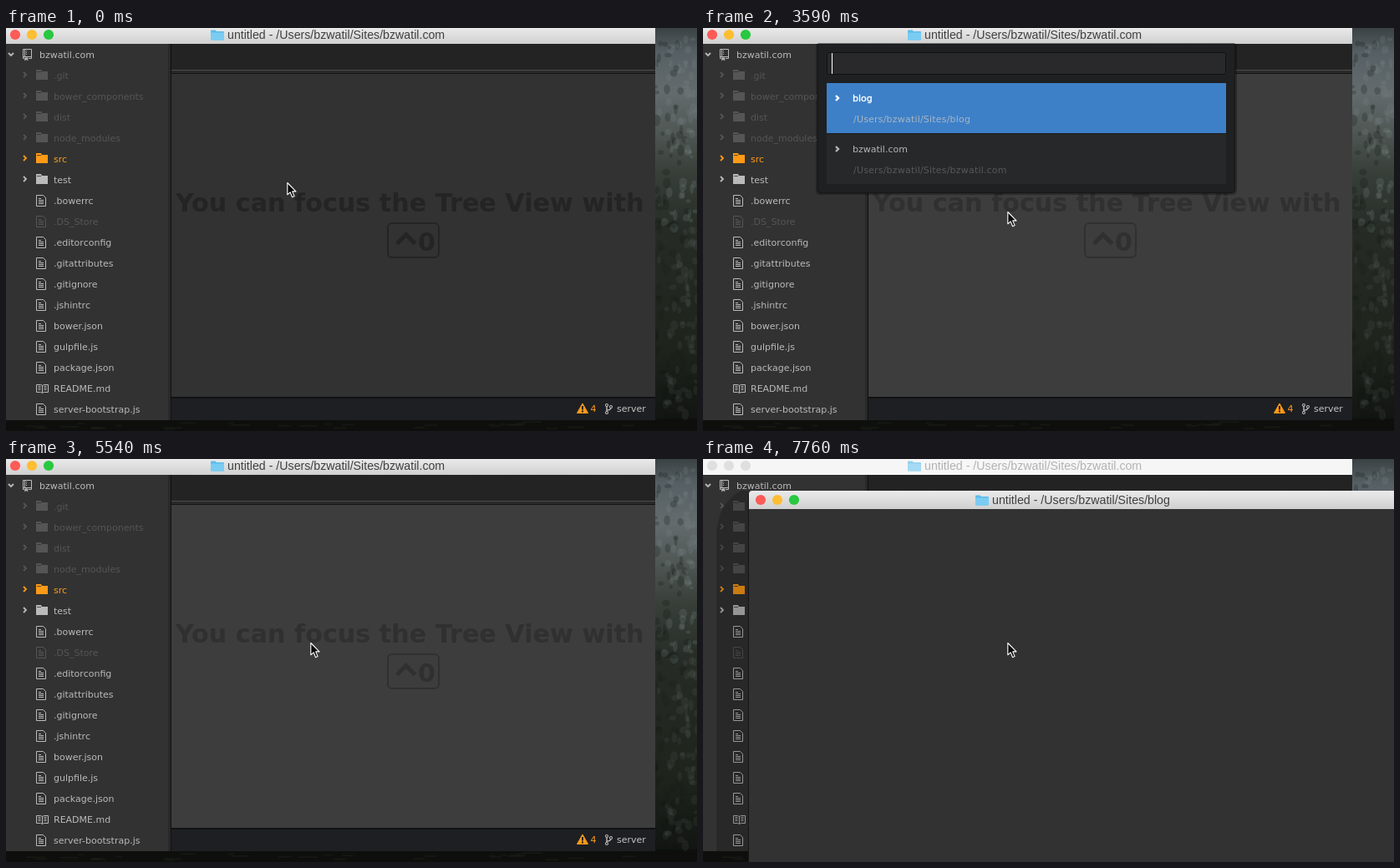
Recreate the animation shown at these times as an HTML page. Size 827 by 483 pixels, loop 8000 ms.

```html
<!DOCTYPE html>
<html lang="en">
<head>
<meta charset="utf-8">
<title>Project switcher</title>
<style>
html, body { margin: 0; width: 100%; height: 100%; overflow: hidden; background: #0d0e0d; }
svg { display: block; width: 827px; height: 483px; }
text { white-space: pre; font-kerning: none; }
.ui { font: 11px "DejaVu Sans", sans-serif; }
.path { font: 11px "DejaVu Sans", sans-serif; letter-spacing: .2px; }
.title { font: 14.2px "Liberation Sans", Arial, sans-serif; }
.tip { font: bold 30.2px "DejaVu Sans", sans-serif; }
</style>
</head>
<body>
<svg id="stage" viewBox="0 0 827 483" xmlns="http://www.w3.org/2000/svg"></svg>
<script>
const LOOP = 8000;
const USER = 'bzwatil', SITE = USER + '.com', ROOT = `/Users/${USER}/Sites/`;
const DIM = '#555', PLAIN = '#bababa', ORANGE = '#ff9a17';

const rect = (x, y, w, h, fill, extra = '') =>
  `<rect x="${x}" y="${y}" width="${w}" height="${h}" fill="${fill}" ${extra}/>`;
const text = (x, y, s, cls, fill, extra = '') =>
  `<text x="${x}" y="${y}" class="${cls}" fill="${fill}" ${extra}>${s}</text>`;
const line = (d, stroke, width = 1, extra = '') =>
  `<path d="${d}" fill="none" stroke="${stroke}" stroke-width="${width}" ${extra}/>`;
const fill = (d, color, extra = '') => `<path d="${d}" fill="${color}" ${extra}/>`;
const at = (x, y, body) => `<g transform="translate(${x} ${y})">${body}</g>`;
const group = (id, body) => `<g id="${id}">${body}</g>`;
const gradient = (id, stops) => `<linearGradient id="${id}" x2="0" y2="1">` +
  stops.map(([o, c]) => `<stop offset="${o}" stop-color="${c}"/>`).join('') + '</linearGradient>';

function random(seed) {
  return () => (seed = (seed * 16807) % 2147483647) / 2147483647;
}

// Misty forest behind the windows: a gradient with small dabs of foliage
function forest() {
  const rnd = random(77);
  let s = rect(770, 0, 57, 483, 'url(#mist)') + rect(0, 468, 827, 15, '#0e0f0d');
  for (let i = 0; i < 220; i++) {
    const x = 777 + rnd() * 50, y = 12 + rnd() * 455;
    const shade = rnd() * 50 < x - 777 ? '#7d878a' : '#0e130e';
    s += `<ellipse cx="${x}" cy="${y}" rx="${2 + rnd() * 3}" ry="${2 + rnd() * 5}" fill="${shade}" opacity="${y < 240 ? .22 : .1}"/>`;
  }
  for (let i = 0; i < 30; i++)
    s += rect(rnd() * 790, 471 + rnd() * 9, 6 + rnd() * 18, 2, '#20251a', 'opacity=".4"');
  return s;
}

const folderBlue = (x, y) => at(x, y,
  fill('M0 1.5Q0 .5 1 .5H5.5L7 2H15Q16 2 16 3V11.5Q16 12.5 15 12.5H1Q0 12.5 0 11.5Z', '#5dbdec') +
  rect(0, 3.5, 16, 9, '#7accf3', 'rx="1"'));

function titleBar(x, y, lights, labelX, label, ink) {
  const dots = lights.map((c, i) =>
    `<circle cx="${x + 11 + i * 20}" cy="${y}" r="6.1" fill="${c}"/>`).join('');
  return dots + folderBlue(labelX - 20, y - 6) + text(labelX, y + 5, label, 'title', ink);
}

const icons = {
  folder: c => fill('M0-7H6L7-5H14V5H0Z', c) + line('M1-4.5H6', '#323232', .8),
  file: c => line('M.5-6.5H8.5L11.5-3.5V6.5H.5ZM3-2.5H6M3-.5H9M3 1.5H9M3 3.5H9', c),
  book: c => line('M.5-4.5H5.5L7.5-3.5 9.5-4.5H14.5V4.5H9.5L7.5 5.5 5.5 4.5H.5ZM7.5-3.5V5M2.5-2.5H5.5M2.5-.5H5.5M2.5 1.5H5.5M9.5-2.5H12.5M9.5-.5H12.5M9.5 1.5H12.5', c)
};
const chevron = (x, y, c, w = 1.8) => line(`M${x} ${y - 3}l3 3-3 3`, c, w);

function treeRow([name, kind, color], i) {
  const y = 57 + i * 25;
  return (kind === 'folder' ? chevron(21, y - 1, color) : '') +
    at(36, y, icons[kind](color)) + text(57, y + 4, name, 'ui', color);
}

function sidebar() {
  const folders = ['.git', 'bower_components', 'dist', 'node_modules']
    .map(n => [n, 'folder', DIM]).concat([['src', 'folder', ORANGE], ['test', 'folder', PLAIN]]);
  const files = ['.bowerrc', '.DS_Store', '.editorconfig', '.gitattributes', '.gitignore', '.jshintrc',
    'bower.json', 'gulpfile.js', 'package.json', 'README.md', 'server-bootstrap.js']
    .map(n => [n, n.endsWith('.md') ? 'book' : 'file', n === '.DS_Store' ? DIM : PLAIN]);
  return rect(0, 19, 195, 451, '#323232') + rect(194, 19, 4, 451, '#292929') + rect(197, 19, 1, 451, '#101010') +
    line('M3 30l3 3 3-3', PLAIN, 1.8) +
    line('M20.5 25.5H30.5V36.5H27M22 36.5H20.5V25.5M22.5 26V34M20.5 34.5H30', PLAIN) +
    fill('M22.3 35.5H26.2V39.5L24.3 37.8 22.3 39.5Z', PLAIN) +
    rect(24, 27, 1, 1, PLAIN) + rect(24, 29, 1, 1, PLAIN) + rect(24, 31, 1, 1, PLAIN) +
    text(40, 36, SITE, 'ui', PLAIN) + folders.concat(files).map(treeRow).join('');
}

const keycap = (x, y, w) =>
  `<rect x="${x}" y="${y}" width="${w}" height="41" rx="5" fill="none" stroke="currentColor" stroke-width="2"/>`;

function editor() {
  const ink = 'currentColor';
  const focus = text(203, 219.5, 'You can focus the Tree View with', 'tip', ink) + keycap(457, 234, 61) +
    line('M468 258.5L478.7 247.5 489.5 258.5', ink, 5) + text(493, 266.5, '0', 'tip', ink);
  const split = text(212, 242.5, 'You can split a pane with', 'tip', ink) + keycap(654, 210, 109) +
    line('M671 226V223.5A3.5 3.5 0 1 0 667.5 227H682.5A3.5 3.5 0 1 0 679 223.5V238.5A3.5 3.5 0 1 0 682.5 235H667.5A3.5 3.5 0 1 0 671 238.5Z', ink, 2.6) +
    text(689, 242.5, 'K', 'tip', ink) + line('M725 234H756M749 227.5l7 6.5-7 6.5', ink, 2);
  return rect(198, 19, 579, 31, '#232323') + rect(198, 50, 579, 1, '#4d4d4d') +
    rect(198, 51, 579, 3, '#292929') + rect(198, 54, 579, 1, '#141414') +
    `<rect id="pane" x="198" y="55" width="579" height="387"/>` +
    group('focusTip', focus) + group('splitTip', split);
}

const statusBar = () =>
  rect(198, 442, 579, 28, '#1e1f22') + rect(198, 442, 579, 2, '#111213') +
  fill('M690 450L696.5 461.5H683.5Z', ORANGE, `stroke="${ORANGE}" stroke-linejoin="round"`) +
  rect(689, 453, 2, 4.5, '#1e1f22') + rect(689, 458.5, 2, 2, '#1e1f22') +
  text(699.5, 460, '4', 'ui', ORANGE) +
  line('M719 453V460M719 458Q724 458 724 455', PLAIN, 1.4) +
  [[719, 452], [719, 461], [724, 454]].map(([x, y]) =>
    `<circle cx="${x}" cy="${y}" r="1.5" fill="#1e1f22" stroke="${PLAIN}" stroke-width="1.1"/>`).join('') +
  text(731, 460, 'server', 'ui', '#c4c4c4');

function listItem(y, name, active) {
  const ink = active ? '#fff' : '#b4b5b7';
  return rect(148, y, 478, 60, active ? '#3d80c8' : '#27282a') +
    chevron(159, y + 18, ink, 2.4) +
    text(179, y + 22, name, 'ui', ink, active ? 'stroke="#fff" stroke-width=".35"' : '') +
    text(180, y + 47, ROOT + name, 'path', active ? '#a9b4c0' : '#57585a');
}
const list = pick => ['blog', SITE].map((n, i) => listItem(66 + i * 61, n, i === pick)).join('');

const dialog = () =>
  fill('M135 19H639V194Q639 200 633 200H141Q135 200 135 194Z', '#000', 'opacity=".3"') +
  fill('M137.5 19V193Q137.5 197.5 142 197.5H632Q636.5 197.5 636.5 193V19Z', '#1f2022', 'stroke="#151617"') +
  rect(148.5, 29.5, 477, 26, '#29292b', 'rx="2" stroke="#101112"') +
  rect(148, 126, 478, 1, '#1b1c1e') +
  group('list0', list(0)) + group('list1', list(1)) +
  group('caret', rect(154, 30, 1, 25, '#fff'));

const newWindow = () =>
  fill('M16 470V90Q18 52 46 38H60V470Z', '#000', 'opacity=".2"') +
  rect(54, 42, 1, 441, '#161616') +
  fill('M55 60V42Q55 38 59 38H827V60Z', 'url(#bar)') + rect(55, 60, 772, 423, '#323232') +
  titleBar(58, 49, ['#fc5b57', '#fdbe32', '#28c840'], 346, `untitled - ${ROOT}blog`, '#404040');

const oldTitle = `untitled - ${ROOT}${SITE}`;
const stage = document.getElementById('stage');
stage.innerHTML =
  '<defs>' + gradient('bar', [[0, '#eaeaea'], [1, '#d0d0d0']]) +
  gradient('mist', [[0, '#3a4244'], [.06, '#566064'], [.16, '#636b6d'], [.26, '#4f5653'],
    [.36, '#383f39'], [.5, '#262c25'], [.8, '#1e231c'], [1, '#101310']]) + '</defs>' +
  forest() + sidebar() + editor() + statusBar() +
  group('activeBar', rect(0, 0, 777, 19, 'url(#bar)') +
    titleBar(0, 8, ['#fc5b57', '#fdbe32', '#28c840'], 265, oldTitle, '#404040')) +
  group('idleBar', rect(0, 0, 777, 19, '#f6f6f6') +
    `<g opacity=".65">${titleBar(0, 8, ['#d3d3d3', '#d3d3d3', '#d3d3d3'], 265, oldTitle, '#8f8f8f')}</g>`) +
  group('dialog', dialog()) +
  group('blank', rect(55, 38, 772, 445, '#fefefe')) +
  group('next', newWindow()) +
  group('cursor', fill('M0 0V14.3L3.3 11.3 5.8 17.2 8.3 16.1 5.9 10.4H10.2Z', '#0a0a0a',
    'stroke="#fff" stroke-width="1.1" stroke-linejoin="round"'));

const el = {};
stage.querySelectorAll('[id]').forEach(e => el[e.id] = e);
const show = (id, on) => el[id].setAttribute('display', on ? 'inline' : 'none');
const within = (t, a, b) => t >= a && t < b;

function draw(t) {
  const light = t >= 2690;
  el.pane.setAttribute('fill', light ? '#3d3d3d' : '#323232');
  stage.style.color = light ? '#303030' : '#242424';
  show('focusTip', t < 7020);
  show('splitTip', t >= 7020);

  const second = within(t, 3740, 4640);
  show('dialog', within(t, 2690, 5540));
  show('list0', !second);
  show('list1', second);
  show('caret', !within(t, 3140, 3590) && !within(t, 3890, 4340) && !within(t, 4790, 5090));

  const opened = t >= 7760;
  show('blank', within(t, 7610, 7760));
  show('next', opened);
  show('idleBar', opened);
  show('activeBar', !opened);
  el.cursor.setAttribute('transform', t < 150 ? 'translate(336.8 185.5)' : 'translate(364.8 220.5)');
}

const start = performance.now();
function tick() {
  draw((performance.now() - start) % LOOP);
  requestAnimationFrame(tick);
}
tick();
</script>
</body>
</html>
```
